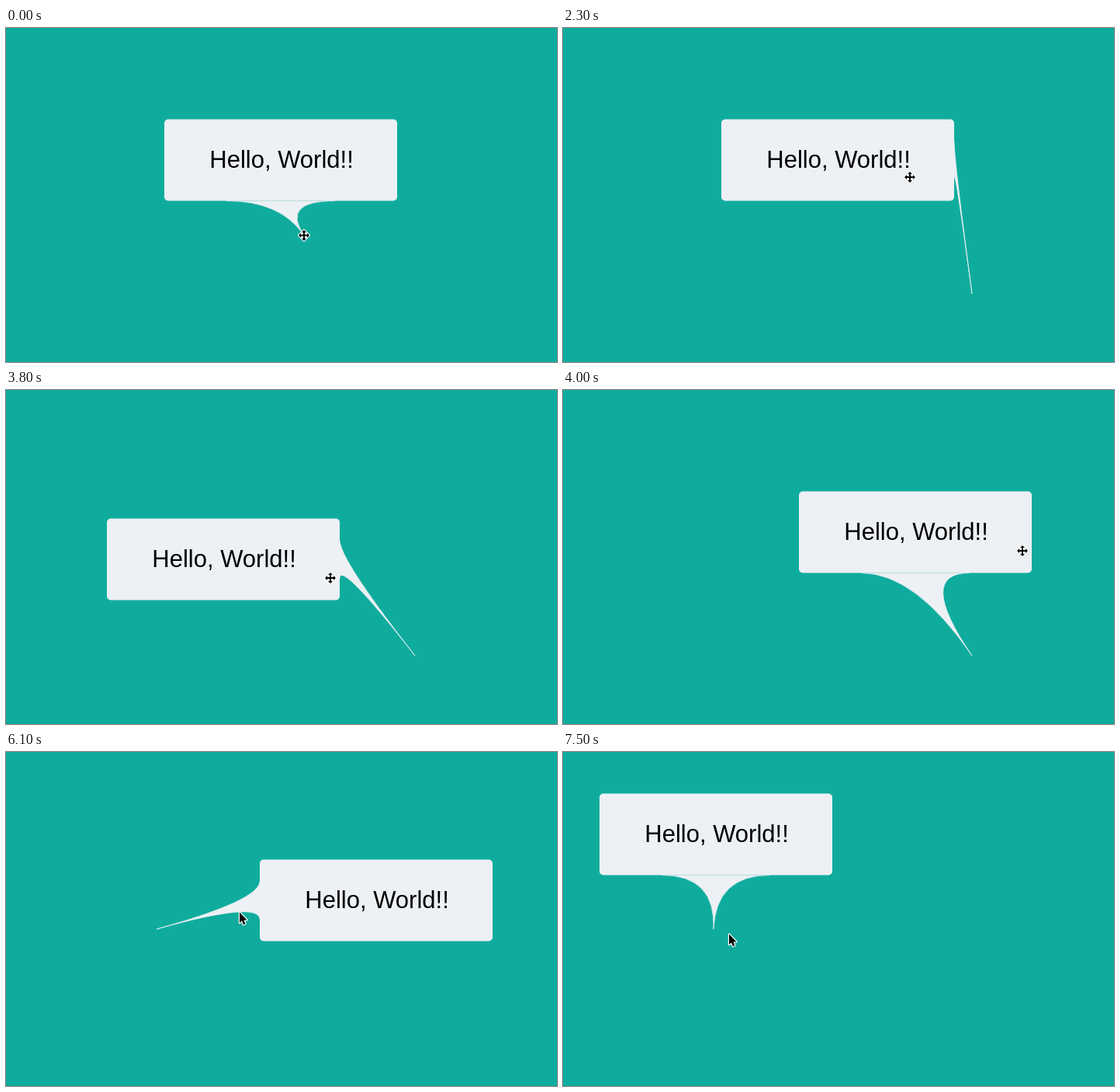
These frames come from a looping animation (710x430 px, 7600 ms). An HTML page with a canvas:

```html
<!DOCTYPE html>
<html lang="en">
<head>
<meta charset="utf-8">
<title>Speech bubble</title>
<style>
  html, body { margin: 0; width: 100%; height: 100%; overflow: hidden; background: #0fac9e; }
  canvas { display: block; }
</style>
</head>
<body>
<canvas id="stage" width="710" height="430"></canvas>
<script>
const ctx = document.getElementById('stage').getContext('2d');
const LOOP = 7600, STEP = 100;
const W = 300, H = 105, RADIUS = 5;

// Tracks: [time, x, y]
const boxTrack = [
  [2900, 204, 118], [3000, 142, 149], [3100, 85, 177], [3200, 79, 181],
  [3700, 79, 181], [3800, 130, 166], [3900, 235, 142], [4000, 304, 131],
  [4100, 325, 124], [4200, 327, 132], [4300, 327, 139],
  [6400, 327, 139], [6500, 320, 133], [6600, 306, 123], [6700, 218, 80],
  [6800, 120, 56], [6900, 60, 48], [7000, 47, 54]
];
const tipTrack = [
  [1300, 384, 267], [1400, 392, 275], [1600, 440, 312], [1800, 492, 335],
  [2000, 523, 342], [2100, 527, 342],
  [5000, 527, 342], [5100, 497, 344], [5200, 412, 347], [5300, 307, 342],
  [5400, 222, 318], [5500, 198, 272], [5600, 194, 240], [5700, 194, 228]
];
const mouseTrack = [
  [2100, 527, 342], [2200, 482, 262], [2300, 447, 192], [2400, 440, 180],
  [2500, 455, 186], [2700, 471, 192], [3200, 346, 255], [3500, 367, 257],
  [4300, 615, 215], [4400, 570, 280], [4500, 536, 324], [4800, 532, 336],
  [5000, 532, 336], [5100, 480, 343], [5200, 350, 342], [5300, 220, 320],
  [5400, 198, 270], [5500, 194, 238], [5600, 194, 228], [5800, 194, 228],
  [6100, 300, 205], [6300, 390, 184], [6400, 402, 180],
  [7000, 122, 95], [7200, 165, 165], [7400, 213, 228], [7500, 213, 233]
];
// While a box is held the pointer keeps its offset: [from, to, dx, dy]
const grabs = [[2700, 3200, 267, 74], [3500, 4300, 288, 76], [6400, 7000, 75, 41]];

function at(track, t) {
  const i = track.findIndex(k => k[0] > t);
  if (i === 0) return { x: track[0][1], y: track[0][2] };
  const a = track[i < 0 ? track.length - 1 : i - 1];
  const b = i < 0 ? a : track[i];
  const p = b === a ? 0 : (t - a[0]) / (b[0] - a[0]);
  return { x: a[1] + (b[1] - a[1]) * p, y: a[2] + (b[2] - a[2]) * p };
}

function mouseAt(t, box, tip) {
  if (t <= 2100) return tip;
  const g = grabs.find(g => t >= g[0] && t <= g[1]);
  return g ? { x: box.x + g[2], y: box.y + g[3] } : at(mouseTrack, t);
}

function drawTail(box, tip) {
  const cx = box.x + W / 2, cy = box.y + H / 2;
  const dx = tip.x - cx, dy = tip.y - cy;
  const side = Math.abs(dx) > Math.abs(dy);
  const mx = side ? cx + Math.sign(dx) * W / 2 : cx;
  const my = side ? cy : cy + Math.sign(dy) * H / 2;
  const ox = side ? 0 : W * 7 / 30, oy = side ? H * 7 / 30 : 0;
  ctx.beginPath();
  ctx.moveTo(mx - ox, my - oy);
  ctx.quadraticCurveTo(mx, my, tip.x, tip.y);
  ctx.quadraticCurveTo(mx, my, mx + ox, my + oy);
  ctx.fill();
  ctx.lineWidth = 0.8;
  ctx.strokeStyle = ctx.fillStyle;
  ctx.stroke();
}

function drawBubble(box, tip) {
  ctx.fillStyle = '#edf0f4';
  drawTail(box, tip);
  ctx.beginPath();
  ctx.roundRect(box.x, box.y, W, H, RADIUS);
  ctx.fill();
  ctx.fillStyle = '#000';
  ctx.font = '31px "Liberation Sans", Arial, sans-serif';
  ctx.textAlign = 'center';
  ctx.fillText('Hello, World!!', box.x + W / 2 + 1, box.y + 62);
}

const arrow = [[1, 1.5], [1, 15], [4, 12.2], [6, 17.2], [8.4, 16.2], [6.4, 11.4], [10.4, 11.2]];
const arm = [[-1, -1], [-1, -4], [-3, -4], [0, -7], [3, -4], [1, -4]];
const cross = [0, 1, 2, 3].flatMap(q => arm.map(([x, y]) => {
  for (let i = 0; i < q; i++) [x, y] = [-y, x];
  return [x, y];
}));

function drawPointer(shape, { x, y }) {
  ctx.beginPath();
  shape.forEach(p => ctx.lineTo(x + p[0], y + p[1]));
  ctx.closePath();
  ctx.lineJoin = 'round';
  ctx.lineWidth = 2.4;
  ctx.strokeStyle = '#fff';
  ctx.stroke();
  ctx.fillStyle = '#000';
  ctx.fill();
}

function draw(t) {
  const box = at(boxTrack, t), tip = at(tipTrack, t);
  const mouse = mouseAt(t, box, tip);
  box.y -= 0.5;
  ctx.fillStyle = '#0fac9e';
  ctx.fillRect(0, 0, 710, 430);
  drawBubble(box, tip);
  const inBox = mouse.x >= box.x && mouse.x <= box.x + W &&
                mouse.y >= box.y && mouse.y <= box.y + H;
  const onTip = Math.hypot(mouse.x - tip.x, mouse.y - tip.y) < 10;
  drawPointer(inBox || onTip ? cross : arrow, mouse);
}

const start = performance.now();
function tick() {
  const t = (performance.now() - start) % LOOP;
  draw(Math.floor(t / STEP) * STEP);
  requestAnimationFrame(tick);
}
tick();
</script>
</body>
</html>
```
